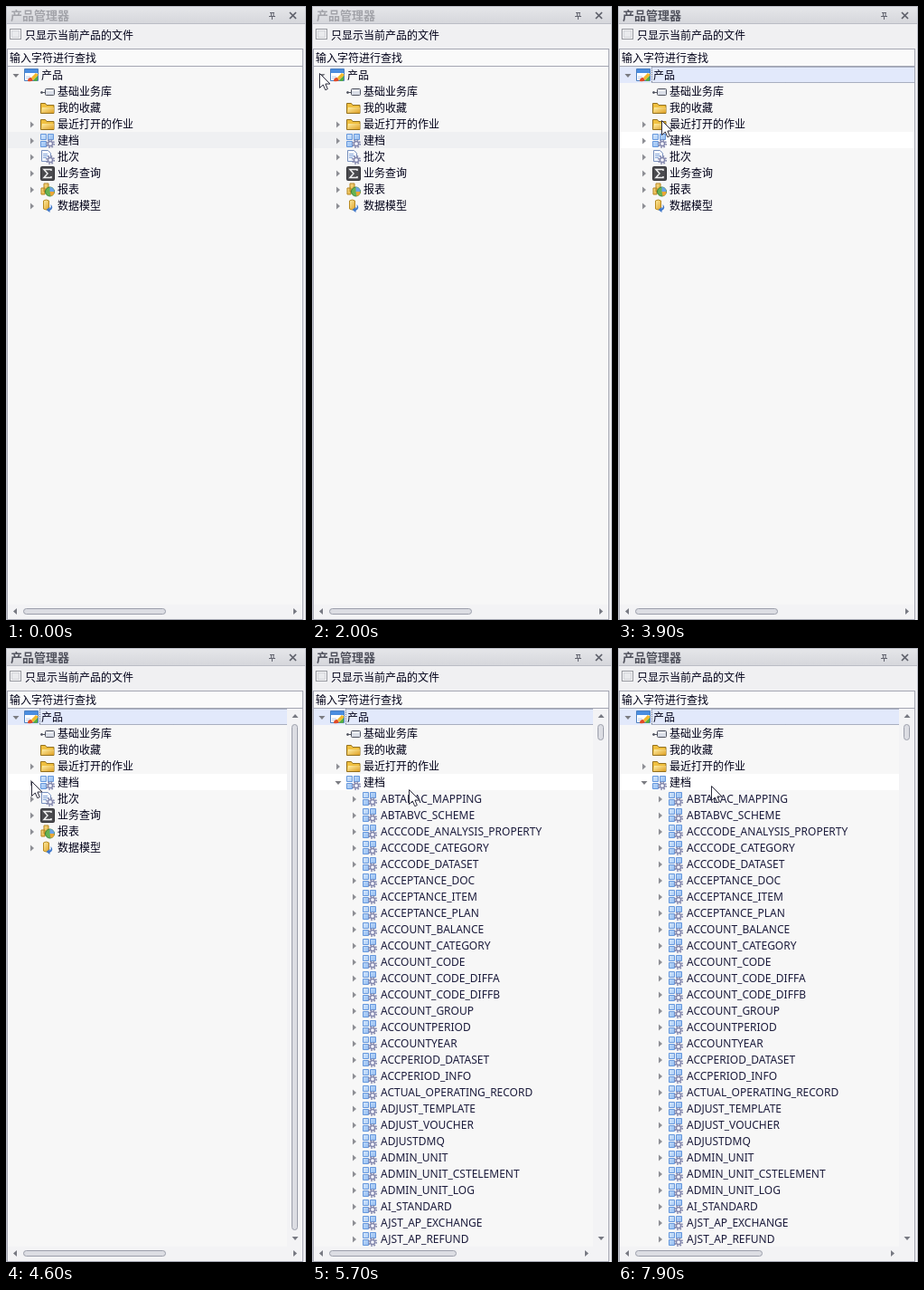
Animation of 332 by 678 pixels, one loop 8000 ms. Source, as an HTML page:

```html
<!DOCTYPE html>
<html lang="zh-CN">
<head>
<meta charset="utf-8">
<style>
html, body { margin: 0; height: 100%; overflow: hidden; background: #f0f0f2; }
svg { display: block; font: 12px "Noto Sans CJK SC", "Noto Sans CJK", sans-serif; fill: #000018; }
.latin { font-family: "Noto Sans", sans-serif; fill: #1c1c3c; }
.thumb { fill: #dcdde3; stroke: #9c9fab; }
</style>
</head>
<body>
<svg id="stage" width="332" height="678" viewBox="0 0 332 678">
  <defs>
    <linearGradient id="bar" x2="0" y2="1"><stop stop-color="#e6e7ea"/><stop offset="1" stop-color="#d5d6db"/></linearGradient>
    <linearGradient id="gold" x2="1" y2="1"><stop stop-color="#fff0a8"/><stop offset="1" stop-color="#dfa024"/></linearGradient>
    <linearGradient id="blue" x2="1" y2="1"><stop stop-color="#d3e6fc"/><stop offset="1" stop-color="#7fb0ee"/></linearGradient>
    <path id="right" d="M-2-3.500 2 0-2 3.500z" fill="#8e8f95"/>
    <path id="down" d="M-3.500-2h7L0 2z" fill="#7b7c82"/>
    <!-- icons are 16 x 16 -->
    <g id="gear" fill="none" stroke="#8286ac">
      <circle r="4.2" stroke-width="1.6" stroke-dasharray="1.7 1.6"/>
      <circle r="2.6" fill="#f4f5fc" stroke-width="1.5"/>
    </g>
    <g id="app">
      <path d="M.5.5h15v13H.5z" fill="#fff" stroke="#4b7fc0"/>
      <path d="M1 1h14v4H1z" fill="#4a8de0"/>
      <path d="M2 8h5v4H2z" fill="#dfe8f5"/>
      <path d="M4 14q0-4 4-4l2 3q-2 2-6 1z" fill="#e04a28"/>
      <path d="M8 10l5-5 3 2-6 6z" fill="#f2b92c"/>
      <path d="M10 13l5-5v5q-2 2-5 0z" fill="#55ad3f"/>
    </g>
    <g id="lib" stroke="#50535f">
      <path d="M1 8.500h4"/><circle cx="1.500" cy="8.500" r="1" fill="#50535f"/>
      <rect x="5.500" y="4.500" width="10" height="7" rx="1" fill="#d9dde6"/>
      <path d="M7 6.500h7" stroke="#fff"/>
    </g>
    <g id="folder" stroke="#94701c">
      <path d="M.5 13.500v-11h5l1.500 2h8v9z" fill="#f0c040"/>
      <path d="M1 13l1-6h13v6z" fill="url(#gold)" stroke="none"/>
    </g>
    <g id="blocks">
      <path d="M.5.5h6v6h-6zM8.500.5h6v6h-6zM.5 8.500h6v6h-6z" fill="url(#blue)" stroke="#6597dc"/>
      <use href="#gear" x="11" y="11"/>
    </g>
    <g id="batch">
      <path d="M1.500.5h7l3 3v9h-10z" fill="#f4f7fd" stroke="#7890bd"/>
      <path d="M3 4.500h5M3 6.500h6M3 8.500h4" stroke="#84a5d8"/>
      <use href="#gear" x="11" y="11"/>
    </g>
    <g id="query">
      <rect x=".5" y=".5" width="15" height="15" rx="1" fill="#4a4a4e" stroke="#303034"/>
      <path d="M12 5V3.500H4L8 8 4 12.500H12V11" fill="none" stroke="#f2f2f2" stroke-width="1.500"/>
    </g>
    <g id="report">
      <path d="M1 6h4v7H1zM4 1h5v9H4z" fill="url(#gold)" stroke="#b5841f"/>
      <circle cx="10.500" cy="10" r="5" fill="#65b354" stroke="#3c8137"/>
      <path d="M10.500 10V5a5 5 0 0 1 5 5z" fill="#6ca4ea"/>
      <path d="M10.500 10h5a5 5 0 0 1-4 5z" fill="#eda536"/>
    </g>
    <g id="model">
      <path d="M3.500 2v9q3 2 6 0V2q-3-2-6 0z" fill="url(#gold)" stroke="#b88a20"/>
      <path d="M11.500 6q4 4-1 7v2l-4-3 4-3v2q2-2 1-5z" fill="#3f78ca"/>
    </g>
  </defs>

  <rect width="332" height="20" fill="url(#bar)"/>
  <path d="M0 .5H332M.5 0V678M331.500 0V678M0 19.500H332" stroke="#bbbdc5"/>
  <text id="title" x="5" y="15" font-size="13" font-weight="700">产品管理器</text>
  <path d="M292 7.500h5M293.500 7v4M296 7v4M291 11.500h7M294.500 12v3" stroke="#62646f" fill="none"/>
  <path d="M314 7l7 7M321 7l-7 7" stroke="#5d5f69" stroke-width="1.700"/>
  <rect x="4.500" y="25.500" width="12" height="11" fill="#f6f6f7" stroke="#96989f"/>
  <rect x="6.500" y="27.500" width="8" height="7" fill="#e9eaed" stroke="#d3d4d9"/>
  <text x="21" y="37">只显示当前产品的文件</text>
  <rect x="1.500" y="47.500" width="327" height="19" fill="#fafafa" stroke="#a4a6b2"/>
  <text x="4" y="62">输入字符进行查找</text>

  <rect x="1.500" y="66.500" width="327" height="611" fill="#f7f7f7" stroke="#a4a6b2"/>
  <rect id="band" x="2" y="139" width="326" height="18"/>
  <g id="focus">
    <rect x="2" y="67" width="326" height="18" fill="#e2e9fb"/>
    <path d="M37.500 67.500H328M37.500 84.500H328M37.500 67V85" stroke="#6d7384" stroke-dasharray="1 1"/>
  </g>
  <g id="tree"></g>

  <g id="vbar">
    <path d="M311 67h17v594h-17z" fill="#f3f3f5"/>
    <path d="M316.500 77l3.500-4 3.500 4zM316.500 650l3.500 4 3.500-4z" fill="#777982"/>
    <rect id="vthumb" class="thumb" x="316.500" y="84.500" width="6" rx="3"/>
  </g>
  <path d="M2 661h326v16H2z" fill="#f3f3f5"/>
  <path d="M12 665v7l-4-3.500z" fill="#777982"/>
  <path id="hright" d="M318 665v7l4-3.500z" fill="#777982"/>
  <rect id="hthumb" class="thumb" x="19.500" y="665.500" height="6" rx="3"/>

  <g id="tip">
    <rect x="320.500" y="112.500" width="80" height="28" rx="1" fill="#fff" stroke="#74767c"/>
    <text x="325" y="131">基础业务库</text>
  </g>
  <path id="cursor" d="M.5.5V16.500L4.300 13 6.800 18.700 9.300 17.600 6.900 12H12z" fill="#fff" stroke="#2c2c3c"/>
</svg>
<script>
const $ = id => document.getElementById(id);
const LOOP = 8000;

const nodes = ['app 产品', 'lib 基础业务库', 'folder 我的收藏', 'folder 最近打开的作业', 'blocks 建档',
  'batch 批次', 'query 业务查询', 'report 报表', 'model 数据模型'];
const records = `ABTABAC_MAPPING ABTABVC_SCHEME ACCCODE_ANALYSIS_PROPERTY ACCCODE_CATEGORY ACCCODE_DATASET
ACCEPTANCE_DOC ACCEPTANCE_ITEM ACCEPTANCE_PLAN ACCOUNT_BALANCE ACCOUNT_CATEGORY ACCOUNT_CODE
ACCOUNT_CODE_DIFFA ACCOUNT_CODE_DIFFB ACCOUNT_GROUP ACCOUNTPERIOD ACCOUNTYEAR ACCPERIOD_DATASET
ACCPERIOD_INFO ACTUAL_OPERATING_RECORD ADJUST_TEMPLATE ADJUST_VOUCHER ADJUSTDMQ ADMIN_UNIT
ADMIN_UNIT_CSTELEMENT ADMIN_UNIT_LOG AI_STANDARD AJST_AP_EXCHANGE AJST_AP_REFUND`.split(/\s+/);

function row(i, level, icon, label, arrow = '') {
  const y = 77 + 18 * i, x = 20 + 18 * level;
  return `<g>${arrow && `<use href="#${arrow}" x="${x - 9}" y="${y}"/>`}
    <use href="#${icon}" x="${x}" y="${y - 8}"/>
    <text x="${x + (level > 1 ? 20 : 19)}" y="${y + 4}" class="${level > 1 ? 'latin' : ''}">${label}</text></g>`;
}

const rows = nodes.map((n, i) => row(i, i ? 1 : 0, ...n.split(' '), !i ? 'down' : i > 2 ? 'right' : ''));
$('tree').innerHTML = rows[0] +
  `<g id="kids">${rows.slice(1, 5).join('')}<g id="rest">${rows.slice(5).join('')}</g></g>
   <g id="list">${records.map((r, i) => row(i + 5, 2, 'blocks', r, 'right')).join('')}</g>`;
const rootArrow = $('tree').querySelector('use');
const filesArrow = $('kids').children[3].querySelector('use');

// cursor tip: time, x, y
const path = [
  [500, 322, 54], [800, 215, 84], [1100, 95, 104], [1300, 50, 101], [1800, 8, 74],
  [3200, 8, 74], [3700, 57, 112], [4100, 39, 139], [4400, 28, 147],
  [5200, 28, 147], [5700, 107, 156], [6100, 149, 181], [6400, 230, 150], [6700, 320, 90],
  [7600, 320, 90], [7700, 270, 108], [7800, 170, 138], [7900, 103, 152]
];

function cursorAt(t) {
  const k = path.findIndex(p => p[0] > t);
  if (k < 0) return path[path.length - 1].slice(1);
  const [t0, x0, y0] = path[k - 1], [t1, x1, y1] = path[k], u = (t - t0) / (t1 - t0);
  return [Math.round(x0 + (x1 - x0) * u), Math.round(y0 + (y1 - y0) * u)];
}

const show = (id, on) => $(id).style.display = on ? '' : 'none';
const set = (id, name, value) => $(id).setAttribute(name, value);

function draw(t) {
  const active = t >= 2100, folded = active && t < 3000, open = t >= 4700;
  set('title', 'fill', active ? '#50525d' : '#a2a3a9');
  set('band', 'fill', active ? '#fff' : '#eff0f2');
  show('focus', active);
  show('kids', !folded);
  show('rest', !open);
  show('list', open);
  rootArrow.setAttribute('href', folded ? '#right' : '#down');
  filesArrow.setAttribute('href', open ? '#down' : '#right');
  show('vbar', t >= 4600);
  set('vthumb', 'height', open ? 17 : 558);
  $('vthumb').style.cssText = t >= 6700 && t < 7700 ? 'fill:#d5def8;stroke:#8795c5' : '';
  set('hthumb', 'width', open ? 140 : 157);
  set('hright', 'transform', `translate(${open ? -16 : 0})`);
  show('tip', t >= 6900 && t < 7700);
  show('cursor', t >= 500);
  if (t >= 500) set('cursor', 'transform', `translate(${cursorAt(t)})`);
}

// the screen refreshes ten times a second
function frame(now) {
  draw(Math.floor(now % LOOP / 100) * 100);
  requestAnimationFrame(frame);
}
draw(0);
requestAnimationFrame(frame);
</script>
</body>
</html>
```
